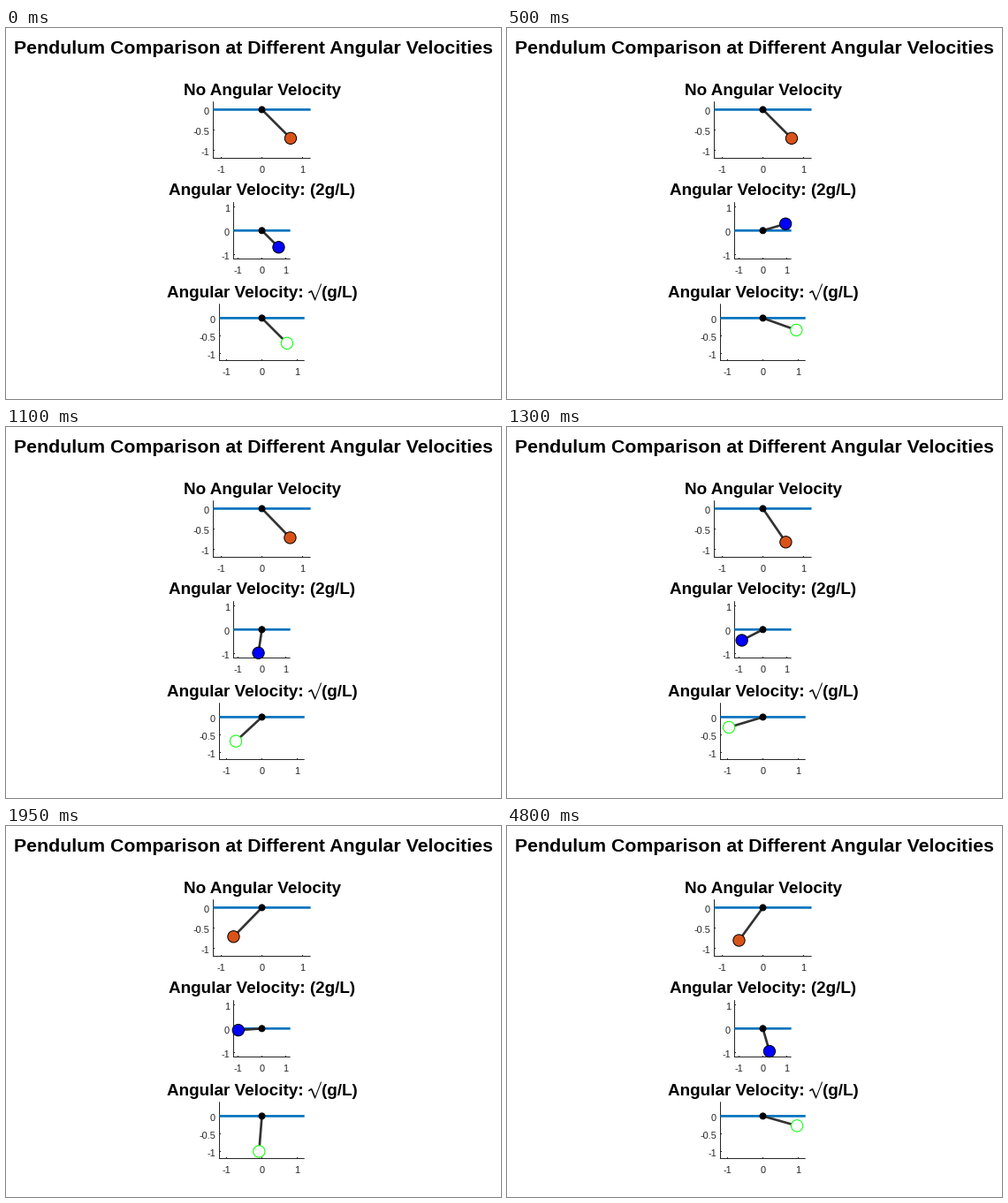
Animation, 560 px wide and 420 px high, one loop 4850 ms. Source, as a matplotlib script:

```python
import numpy as np
import matplotlib.pyplot as plt
from matplotlib.animation import FuncAnimation
from matplotlib.patches import Circle

W, H, DPI = 560, 420, 80
PX = 72 / DPI                      # points per pixel
GRAVITY, DURATION, START = 9.81, 5.0, np.pi / 4
FRAMES, STEP_MS = 97, 50
HOLD_FROM, HOLD_TO = 39, 95        # the picture rests between these frames
INK, BEAM, ROD = "#262626", "#0072bd", "#333333"

# Dormand-Prince 4(5) pair: stages, error weights and dense output
STAGES = [np.array(row) for row in (
    [1/5],
    [3/40, 9/40],
    [44/45, -56/15, 32/9],
    [19372/6561, -25360/2187, 64448/6561, -212/729],
    [9017/3168, -355/33, 46732/5247, 49/176, -5103/18656],
    [35/384, 0, 500/1113, 125/192, -2187/6784, 11/84])]
ERROR = np.array([71/57600, 0, -71/16695, 71/1920, -17253/339200, 22/525, -1/40])
DENSE = np.array([
    [1, -183/64, 37/12, -145/128],
    [0, 0, 0, 0],
    [0, 1500/371, -1000/159, 1000/371],
    [0, -125/32, 125/12, -375/64],
    [0, 9477/3392, -729/106, 25515/6784],
    [0, -11/7, 11/3, -55/28],
    [0, 3/2, -4, 5/2]])


def swing(y):
    return np.array([y[1], -GRAVITY * np.sin(y[0])])


def solve(speed, rtol=1e-3, floor=1e-3):
    """Adaptive steps as a list of (t, h, y, slopes)."""
    t, y = 0.0, np.array([START, speed])
    f = swing(y)
    rate = np.max(np.abs(f) / np.maximum(np.abs(y), floor)) / (0.8 * rtol ** 0.2)
    h_max = 0.1 * DURATION
    h = min(h_max, 1 / rate)
    steps, done = [], False
    while not done:
        h = min(h, h_max)
        failed = False
        done = 1.1 * h >= DURATION - t
        if done:
            h = DURATION - t
        while True:
            k = [f]
            for row in STAGES:
                y_new = y + h * (row @ np.array(k))
                k.append(swing(y_new))
            k = np.array(k)
            scale = np.maximum(np.maximum(np.abs(y), np.abs(y_new)), floor)
            err = h * np.max(np.abs(ERROR @ k) / scale)
            if err <= rtol:
                break
            h *= 0.5 if failed else max(0.1, 0.8 * (rtol / err) ** 0.2)
            failed, done = True, False
        steps.append((t, h, y, k))
        t, y, f = t + h, y_new, k[-1]
        if not failed:
            h /= max(0.2, 1.25 * (err / rtol) ** 0.2)
    return steps


def angle_in(step, s):
    _, h, y, k = step
    return y[0] + h * (k[:, 0] @ DENSE @ s ** np.arange(1, 5))


def solver_angles(speed):
    """Four angles from each solver step, so the time base is uneven."""
    angles = [START]
    for step in solve(speed):
        angles += [angle_in(step, s) for s in (0.25, 0.5, 0.75, 1.0)]
    return angles


def even_angles(speed):
    steps = solve(speed)
    starts = [step[0] for step in steps]
    angles = []
    for t in np.linspace(0, DURATION, FRAMES):
        step = steps[max(0, np.searchsorted(starts, t, side="right") - 1)]
        angles.append(angle_in(step, (t - step[0]) / step[1]))
    return angles


fig = plt.figure(figsize=(W / DPI, H / DPI), dpi=DPI, facecolor="white")
ax = fig.add_axes([0, 0, 1, 1])
ax.set(xlim=(0, W), ylim=(H, 0))
ax.axis("off")


def label(x, y, text, size, ha="center", weight="normal", color="black"):
    ax.text(x, y, text, fontsize=size * PX, ha=ha, va="baseline",
            family="Liberation Sans", weight=weight, color=color)


def heading(x, y, text, size=18.85, ha="center"):
    label(x, y, text, size, ha, weight="bold")


def line(xs, ys, color, width, **kw):
    return ax.plot(xs, ys, color=color, lw=width * PX, snap=False,
                   solid_capstyle="butt", **kw)[0]


def disc(x, y, diameter, face, edge, zorder):
    return ax.add_patch(Circle((x, y), diameter / 2, fc=face, ec=edge,
                               lw=1 * PX, zorder=zorder))


def crisp(v):
    """Centre of the pixel that holds v."""
    return np.floor(v) + 0.5


class Pendulum:
    X0, HEIGHT = 289.5, 64.26

    def __init__(self, y0, top, yticks, angles, face, edge):
        self.y0, self.angles = y0, angles
        self.unit = unit = self.HEIGHT / (1.2 + top)
        left, right = self.X0 - 1.2 * unit, self.X0 + 1.2 * unit
        axis_x, axis_y = crisp(left), crisp(y0 + 1.2 * unit)
        line([axis_x, axis_x], [y0 - top * unit, axis_y + 0.5], INK, 1)
        line([axis_x, right], [axis_y, axis_y], INK, 1)
        for v in (-1, 0, 1):
            x = crisp(self.X0 + v * unit)
            line([x, x], [axis_y, axis_y - 1.5], INK, 1)
            label(self.X0 + v * unit, axis_y + 16.8, f"{v}", 11, color=INK)
        for v in yticks:
            y = crisp(y0 - v * unit)
            line([axis_x, axis_x + 1.5], [y, y], INK, 1)
            label(left - 4.4, y0 - v * unit + 5.8, f"{v}", 11, ha="right",
                  color=INK)
        line([left, right], [y0, y0], BEAM, 2.67, zorder=3)
        self.rod = line([], [], ROD, 2.67, zorder=4)
        disc(self.X0, y0, 7, "black", "black", 5)
        self.bob = disc(self.X0, y0, 13.3, face, edge, 6)

    def pose(self, i):
        a = self.angles[min(i, len(self.angles) - 1)]
        x = self.X0 + self.unit * np.sin(a)
        y = self.y0 + self.unit * np.cos(a)
        self.rod.set_data([self.X0, x], [self.y0, y])
        self.bob.center = x, y
        return self.rod, self.bob


heading(279.6, 29, "Pendulum Comparison at Different Angular Velocities", 21.27)
heading(289.6, 76, "No Angular Velocity")
heading(289.6, 189, "Angular Velocity: (2g/L)")
heading(182.4, 305, "Angular Velocity:", ha="left")
heading(397.3, 305, "(g/L)", ha="right")
line([342.3, 345.6, 349.6], [299.8, 297.8, 307.6], "black", 1.6)
line([349.4, 356.6], [308.4, 289.6], "black", 1)

pendulums = [
    Pendulum(92.4, 0.2, (0, -0.5, -1), solver_angles(0.0),
             "#d95319", "black"),
    Pendulum(229.3, 1.2, (1, 0, -1), even_angles(np.sqrt(2 * GRAVITY)),
             "#0000ff", "black"),
    Pendulum(328.4, 0.4, (0, -0.5, -1), even_angles(np.sqrt(GRAVITY)),
             "white", "#00ff00"),
]


def update(frame):
    i = HOLD_FROM if HOLD_FROM <= frame < HOLD_TO else frame
    return [artist for p in pendulums for artist in p.pose(i)]


anim = FuncAnimation(fig, update, frames=FRAMES, interval=STEP_MS,
                     repeat=True, repeat_delay=0, blit=False)
plt.show()
```
